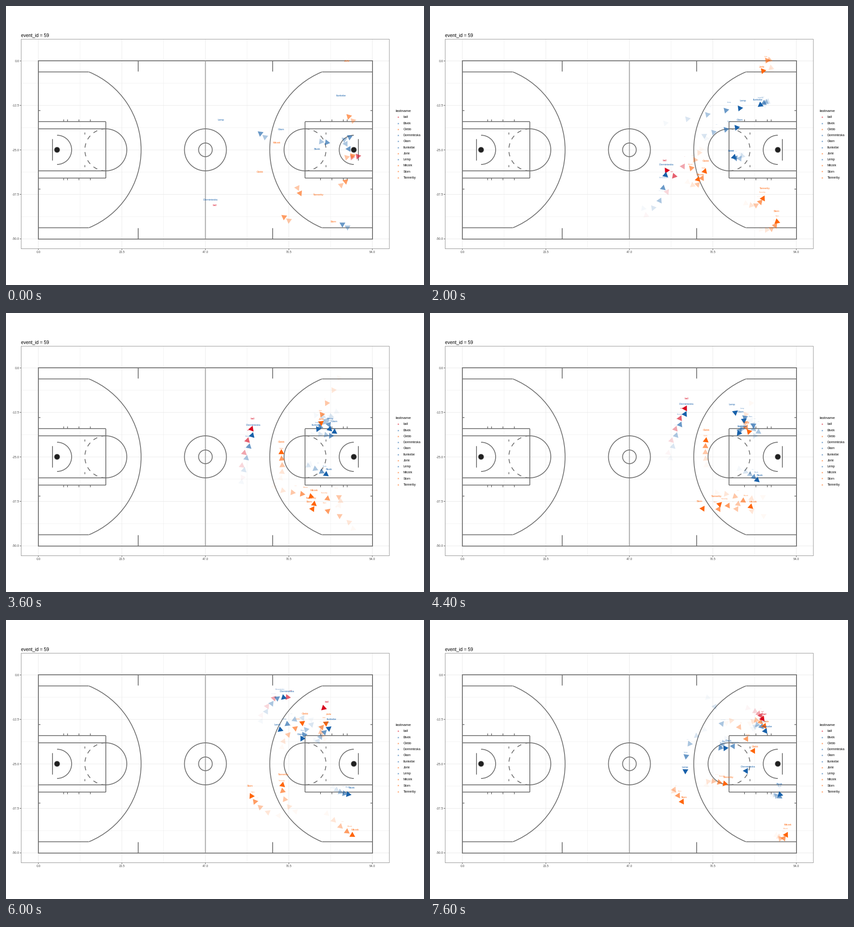
Animation of 917x611 px, one loop 8 s. Source, as a matplotlib script:

```python
import numpy as np
import matplotlib.pyplot as plt
from matplotlib.animation import FuncAnimation
from matplotlib.collections import PolyCollection
from matplotlib.colors import to_rgba
from matplotlib.patches import Arc, Circle, Rectangle

W, H, DPI = 917, 611, 64
FRAMES, INTERVAL = 20, 400
PT = 72 / DPI
RED, BLUE, ORANGE = "#d90820", "#1861aa", "#ff660c"
LINE = "#717171"
MID_X, MID_Y = 437.5, 315
RADIUS = 7.4      # triangle centre to corner
LABEL_GAP = 15.6
STRIDE = 13       # spacing of the triangles left by the previous play
WAKE = 5

plt.rcParams["font.family"] = ["Liberation Sans", "DejaVu Sans"]
plt.rcParams["path.snap"] = False
fig = plt.figure(figsize=(W / DPI, H / DPI), dpi=DPI, facecolor="white")
ax = fig.add_axes([0, 0, 1, 1])
ax.set_xlim(0, W)
ax.set_ylim(H, 0)
ax.axis("off")


def line(xs, ys, color=LINE, width=1.8, z=2):
    ax.plot(xs, ys, color=color, lw=width * PT, zorder=z,
            solid_capstyle="butt")


def text(x, y, s, px, color="black", ha="left", **kw):
    """Text whose capitals are centred on y."""
    return ax.text(x, y + 0.36 * px, s, fontsize=px * PT, color=color,
                   ha=ha, va="baseline", **kw)


def arc(x, y, r, middle, spread):
    ax.add_patch(Arc((x, y), 2 * r, 2 * r, theta1=middle - spread,
                     theta2=middle + spread, color=LINE, lw=1.8 * PT, zorder=2))


def draw_panel():
    xs = np.linspace(71, 803.7, 5)
    ys = np.linspace(120.3, 510, 5)
    for shift, width in ((0, 0.9), (0.5, 0.5)):
        for x in xs[0] + (np.arange(5 - 2 * shift) + shift) * (xs[1] - xs[0]):
            line([x, x], [73, 531.5], "#e8e8e8", width, 1)
        for y in ys[0] + (np.arange(5 - 2 * shift) + shift) * (ys[1] - ys[0]):
            line([33, 841], [y, y], "#e8e8e8", width, 1)
    for i, (x, y) in enumerate(zip(xs, ys)):
        line([x, x], [531.5, 534.3], "#333333", 0.9)
        line([30.3, 33], [y, y], "#333333", 0.9)
        text(x, 538.3, f"{23.5 * i:.1f}", 6.8, "#4d4d4d", "center")
        text(29, y, f"{0 - 12.5 * i:.1f}", 6.8, "#4d4d4d", "right")
    ax.add_patch(Rectangle((33.3, 72.8), 807.7, 458.8, fill=False,
                           ec="#858585", lw=0.9 * PT, zorder=6))
    text(33, 63, "event_id = 59", 10.1)


def draw_half(side):
    """One half of the court; side is -1 for left and 1 for right."""
    def at(d):
        return MID_X + side * d

    end, lane, hoop = at(366.5), at(218.5), at(325.5)
    inward, outward = (0, 180) if side < 0 else (180, 0)
    line([lane, lane], [253.5, 377])
    for flip in (-1, 1):
        def y(d):
            return MID_Y + flip * d
        line([end, at(256)], [y(170.6)] * 2)
        line([at(147.5)] * 2, [y(171.5), y(195)])
        line([end, lane], [y(61.8)] * 2)
        line([end, lane], [y(46)] * 2)
        line([end, at(362)], [y(86)] * 2, width=1.6)
        for d in (311, 302.5, 277.5, 252.5):
            line([at(d)] * 2, [y(62), y(66.5)], width=1.6)
        line([at(264.5)] * 2, [y(33.5), y(38)], width=1.6)
    arc(hoop, MID_Y, 184.4, inward, np.degrees(np.arcsin(170.6 / 184.4)))
    arc(lane, MID_Y, 46, inward, 90)
    arc(hoop, MID_Y, 32, inward, 90)
    for dash in range(-7, 8, 2):
        arc(lane, MID_Y, 46, outward + 12 * dash, 6)
    line([at(335.5)] * 2, [291.5, 338.5])
    ax.add_patch(Circle((hoop, MID_Y), 5.8, fc="#202020", ec="#555555",
                        lw=PT, zorder=2))


def draw_court():
    ax.add_patch(Rectangle((71, 120), 733, 390.5, fill=False, ec=LINE,
                           lw=1.9 * PT, zorder=2))
    line([MID_X] * 2, [120, 510], "#a6a6a6", 2)
    for r in (46, 15):
        arc(MID_X, MID_Y, r, 0, 180)
    draw_half(-1)
    draw_half(1)


def smooth_path(keys):
    """Cubic curve through {step: (x, y)}, read at every step."""
    t = np.array(list(keys), float)
    p = np.array(list(keys.values()), float)

    def slope(a, b):
        return (p[b] - p[a]) / (t[b] - t[a])

    last = len(t) - 1
    m = [slope(max(i - 1, 0), min(i + 1, last)) for i in range(last + 1)]
    path = []
    for step in range(FRAMES):
        i = min(np.searchsorted(t, step, side="right") - 1, last - 1)
        gap = t[i + 1] - t[i]
        u = (step - t[i]) / gap
        ease = u * u * (3 - 2 * u)
        path.append(p[i] + (p[i + 1] - p[i]) * ease
                    + gap * u * (1 - u) * ((1 - u) * m[i] - u * m[i + 1]))
    return np.array(path)


class Player:
    def __init__(self, name, color, previous, keys):
        """previous: where the last play ended, as x, y and heading;
        keys: tip of the triangle at a few steps."""
        self.name, self.color = name, color
        self.previous = previous
        self.path = smooth_path(keys)

    def triangle(self, k):
        if k < 0:
            x, y, degrees = self.previous
            heading = np.radians(degrees)
            toward = np.array([np.cos(heading), np.sin(heading)])
            centre = np.array([x, y]) + (k + 1) * STRIDE * toward
        else:
            dx, dy = self.path[k] - self.path[k - 1]
            heading = np.arctan2(dy, dx)
            toward = np.array([np.cos(heading), np.sin(heading)])
            centre = self.path[k] - RADIUS * toward
        angles = heading + np.arange(3) * 2 * np.pi / 3
        return centre + RADIUS * np.column_stack([np.cos(angles), np.sin(angles)])


players = [
    Player("ball", RED, (772, 329, -10), {
        0: (458, 452), 1: (481, 461), 3: (559, 345), 4: (531, 378),
        5: (515, 354), 9: (541, 247), 13: (593, 166), 14: (625, 170),
        15: (704, 195), 19: (734, 222)}),
    Player("Bivek", BLUE, (704, 299, 8), {
        0: (682, 329), 2: (680, 334), 5: (660, 333), 8: (699, 351),
        12: (731, 376), 15: (758, 383), 17: (767, 383), 19: (766, 375)}),
    Player("Clebb", ORANGE, (760, 328, -15), {
        0: (557, 379), 2: (583, 395), 5: (605, 355), 9: (604, 298),
        12: (612, 259), 15: (656, 221), 16: (668, 219), 19: (713, 293)}),
    Player("Dorminteska", BLUE, (738, 478, -150), {
        0: (448, 440), 2: (497, 441), 5: (518, 363), 9: (542, 261),
        13: (587, 177), 15: (616, 172), 17: (643, 234), 19: (697, 337)}),
    Player("Glarn", BLUE, (752, 313, 60), {
        0: (604, 286), 2: (608, 280), 5: (680, 265), 8: (720, 269),
        9: (721, 253), 12: (663, 227), 13: (656, 247), 15: (646, 266),
        17: (637, 280), 19: (655, 280)}),
    Player("Ilunkebe", BLUE, (754, 287, -25), {
        0: (735, 212), 2: (734, 212), 5: (719, 221), 8: (684, 255),
        11: (685, 264), 13: (694, 250), 15: (714, 233), 17: (725, 231),
        19: (740, 249)}),
    Player("Jorle", ORANGE, (752, 242, -135), {
        0: (748, 136), 2: (747, 128), 3: (743, 111), 5: (728, 149),
        8: (690, 229), 10: (697, 257), 13: (690, 238), 15: (708, 222),
        17: (723, 221), 19: (738, 238)}),
    Player("Lemp", BLUE, (558, 279, -142), {
        0: (472, 265), 2: (572, 246), 5: (687, 223), 8: (711, 251),
        9: (712, 247), 10: (685, 224), 12: (643, 214), 15: (596, 245),
        17: (565, 277), 19: (560, 338)}),
    Player("Mirzek", ORANGE, (645, 410, 65), {
        0: (594, 315), 2: (587, 328), 4: (571, 362), 5: (593, 385),
        9: (676, 404), 13: (739, 457), 15: (766, 475), 17: (776, 478),
        19: (785, 464)}),
    Player("Slorn", ORANGE, (610, 462, -144), {
        0: (718, 488), 2: (746, 490), 5: (760, 465), 8: (699, 431),
        11: (591, 428), 13: (552, 405), 15: (535, 379), 16: (533, 368),
        19: (557, 404)}),
    Player("Tannerby", ORANGE, (745, 384, -40), {
        0: (685, 429), 2: (712, 438), 5: (734, 415), 7: (724, 399),
        9: (669, 421), 11: (628, 417), 13: (609, 386), 15: (608, 354),
        19: (654, 360)}),
]


def draw_legend():
    text(854, 228.7, "lastname", 8.4)
    for i, player in enumerate(players):
        y = 243 + 13.23 * i
        text(860.3, y + 0.4, "a", 5.6, player.color, "center")
        text(871.5, y, player.name, 6.8)


draw_panel()
draw_court()
draw_legend()
markers = PolyCollection([], linewidths=0, zorder=4)
ax.add_collection(markers)
labels = []


def update(frame):
    while labels:
        labels.pop().remove()
    shapes, colors = [], []
    for lag in reversed(range(WAKE)):
        k = frame - lag
        fade = (1 - lag / WAKE) ** 2
        for player in players:
            # a play opens without headings, so step 0 has labels only
            if k >= -2 and k != 0:
                shapes.append(player.triangle(k))
                colors.append(to_rgba(player.color, fade))
            if k >= 0 and lag < 3:
                x, y = player.path[k]
                labels.append(text(x, y - LABEL_GAP, player.name, 5.6 * fade,
                                   player.color, "center", alpha=fade, zorder=5))
    markers.set_verts(shapes)
    markers.set_facecolor(colors)
    return [markers, *labels]


anim = FuncAnimation(fig, update, frames=FRAMES, interval=INTERVAL,
                     init_func=lambda: [markers], repeat=True, repeat_delay=0)
plt.show()
```
